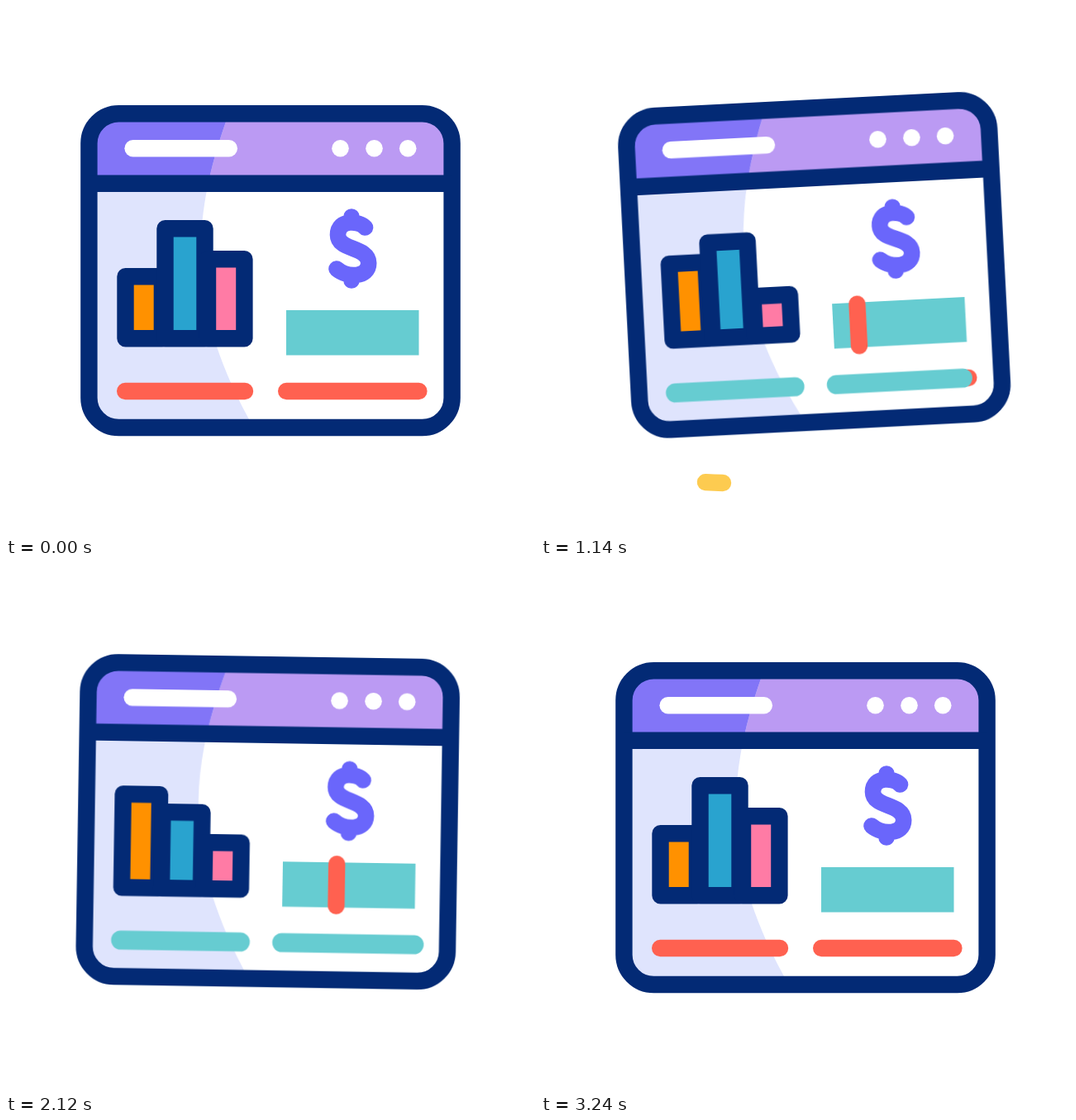
An HTML page for the animation above (3600 ms loop, 640x640 px).

```html
<!DOCTYPE html>
<html lang="en">
<head>
<meta charset="utf-8">
<title>Dashboard window</title>
<style>
  html, body { margin: 0; width: 100%; height: 100%; overflow: hidden; background: #fff; }
  svg { display: block; width: 100vw; height: 100vh; }

  :root {
    --navy: #032a75;
    --teal: #66ccd1;
    --red: #ff6150;
    --yellow: #fdcb50;
    --sine: cubic-bezier(.37, 0, .63, 1);
  }

  .anim { animation: 3.6s var(--sine) infinite both; }
  .round { fill: none; stroke-linecap: round; stroke-linejoin: round; }

  /* Window */
  .hop { animation-name: hop; }
  .sway { animation-name: sway; transform-origin: 320px 112px; }
  @keyframes hop {
    0%, 2.78% { transform: translateY(0); }
    13.33% { transform: translateY(-52px); }
    30.83% { transform: translateY(-6px); }
    44.17% { transform: translateY(-54.5px); }
    61.11% { transform: translateY(-5px); }
    68.33% { transform: translateY(-3px); }
    76.11% { transform: translateY(0); }
    83.06% { transform: translateY(-72px); }
    90%, 100% { transform: translateY(0); }
  }
  @keyframes sway {
    0%, 2.78% { transform: rotate(0deg); }
    20% { transform: rotate(3.9deg); }
    37.22% { transform: rotate(-5deg); }
    52.5% { transform: rotate(4.1deg); }
    68.33% { transform: rotate(-5deg); }
    86.11%, 100% { transform: rotate(0deg); }
  }

  .dots { fill: #fff; animation-name: blink; }
  @keyframes blink {
    0%, 41.67%, 53.33%, 100% { fill: #fff; }
    43.33%, 51.67% { fill: var(--yellow); }
  }

  /* Bar chart: heights include the outline */
  .bar { stroke: var(--navy); stroke-width: 20.4; stroke-linejoin: round; }
  .bar1 { fill: #ff9100; animation-name: bar1; }
  .bar2 { fill: #29a3cf; animation-name: bar2; }
  .bar3 { fill: #ff7ba5; animation-name: bar3; }
  @keyframes bar1 {
    0%, 2.78% { height: 75px; }
    20% { height: 38px; }
    38.06%, 60% { height: 113px; }
    78.89%, 100% { height: 75px; }
  }
  @keyframes bar2 {
    0%, 2.78% { height: 133px; }
    20% { height: 146px; }
    41.67%, 60% { height: 92px; }
    78.89%, 100% { height: 133px; }
  }
  @keyframes bar3 {
    0%, 2.78% { height: 96px; }
    20%, 31.67% { height: 48px; }
    44.44%, 60% { height: 56px; }
    78.89%, 100% { height: 96px; }
  }

  .dollar { stroke: #6a66fb; stroke-width: 19.6; animation-name: swing; transform-origin: 418px 255px; }
  @keyframes swing {
    0%, 36.11% { transform: rotate(0deg); }
    42.22% { transform: rotate(6deg); }
    48.89% { transform: rotate(-5.8deg); }
    56.67%, 100% { transform: rotate(0deg); }
  }

  /* Sliders crossing the panel */
  .slider {
    stroke: var(--red); stroke-width: 20.4;
    animation: slide 3.6s var(--sine) infinite backwards, fade 3.6s linear infinite backwards;
    animation-delay: .796s;
  }
  .late { animation-delay: 1.592s; }
  @keyframes slide {
    0% { transform: translateX(0); }
    33.33%, 100% { transform: translateX(160.5px); }
  }
  @keyframes fade {
    0%, 33.33%, 100% { opacity: 0; }
    2.78%, 30.5% { opacity: 1; }
  }

  /* Progress lines */
  .base { stroke: var(--red); stroke-width: 20.4; }
  .fill { stroke: var(--teal); stroke-width: 23; stroke-dasharray: 1 2; }
  .fill1 { animation-name: fill1; }
  .fill2 { animation-name: fill2; }
  @keyframes fill1 {
    0%, 5.56%, 80%, 100% { stroke-dashoffset: 1.02; }
    19.44%, 65% { stroke-dashoffset: 0; }
  }
  @keyframes fill2 {
    0%, 21.11%, 83.33%, 100% { stroke-dashoffset: 1.02; }
    33.33%, 68.89% { stroke-dashoffset: 0; }
  }

  /* Swooshes */
  .swoosh { stroke: var(--yellow); stroke-width: 20.4; animation-timing-function: linear; }
  .left { animation-name: left; }
  .right { animation-name: right; }
  @keyframes left {
    0%, 5.28% { visibility: hidden; stroke-dasharray: 0 3; stroke-dashoffset: 0; }
    21.39% { visibility: visible; stroke-dasharray: .89 3; stroke-dashoffset: 0; }
    23.33% { visibility: visible; stroke-dasharray: .826 3; stroke-dashoffset: -.174; }
    32.56%, 100% { visibility: hidden; stroke-dasharray: 0 3; stroke-dashoffset: -1; }
  }
  @keyframes right {
    0%, 32.78% { visibility: hidden; stroke-dasharray: 0 3; stroke-dashoffset: 0; }
    38.06% { visibility: visible; stroke-dasharray: .6 3; stroke-dashoffset: 0; }
    41.67% { visibility: visible; stroke-dasharray: .66 3; stroke-dashoffset: -.34; }
    48.67%, 100% { visibility: hidden; stroke-dasharray: 0 3; stroke-dashoffset: -1; }
  }
</style>
</head>
<body>
<svg viewBox="0 0 640 640">
  <defs>
    <clipPath id="pane"><rect x="100" y="130" width="440" height="380" rx="36"/></clipPath>
    <clipPath id="shade"><path d="M90 120H272L266 140C221 268 223 370 294 500L306 520H90Z"/></clipPath>
  </defs>

  <path class="anim round swoosh left" pathLength="1" d="M21 432C21 512 110 577 220 577"/>
  <path class="anim round swoosh right" pathLength="1" d="M615 450C615 535 565 588 493 588C458 588 430 577 403 557"/>

  <g class="anim hop"><g class="anim sway">
    <g clip-path="url(#pane)">
      <rect x="90" y="120" width="460" height="400" fill="#fff"/>
      <rect x="90" y="120" width="460" height="95" fill="#bb9af3"/>
      <g clip-path="url(#shade)">
        <rect x="90" y="120" width="230" height="400" fill="#dfe4fd"/>
        <rect x="90" y="120" width="230" height="95" fill="#8275f7"/>
      </g>
    </g>
    <g fill="none" stroke="var(--navy)" stroke-width="20.4">
      <rect x="100.4" y="130.2" width="439.2" height="379.8" rx="36"/>
      <path d="M100 214.8H540"/>
    </g>

    <path class="round" stroke="#fff" stroke-width="20.6" d="M153.7 172.3H269.7"/>
    <g class="anim dots">
      <circle cx="404.5" cy="172.2" r="10.3"/>
      <circle cx="445.5" cy="172.2" r="10.3"/>
      <circle cx="486.2" cy="172.2" r="10.3"/>
    </g>

    <g transform="translate(0 392.3) scale(1 -1)">
      <rect class="anim bar bar1" x="144.5" y="-10" width="44.4" height="75"/>
      <rect class="anim bar bar2" x="192.5" y="-10" width="48" height="133"/>
      <rect class="anim bar bar3" x="244" y="-10" width="44.4" height="96"/>
    </g>

    <path class="anim round dollar" d="M434.5 268C428 260 401.5 257 401.5 277C401.5 296 438.7 291 438.7 311C438.7 329 413 329 400 318M418 255V261M418 326V332"/>

    <rect x="339" y="368" width="160.5" height="54.5" fill="var(--teal)"/>
    <path class="round slider" d="M339 370V420.5"/>
    <path class="round slider late" d="M339 370V420.5"/>

    <path class="round base" d="M144.2 466H289M339.2 466H499.4"/>
    <path class="anim round fill fill1" pathLength="1" d="M144.2 466H289"/>
    <path class="anim round fill fill2" pathLength="1" d="M339.2 466H499.4"/>
  </g></g>
</svg>
</body>
</html>
```
